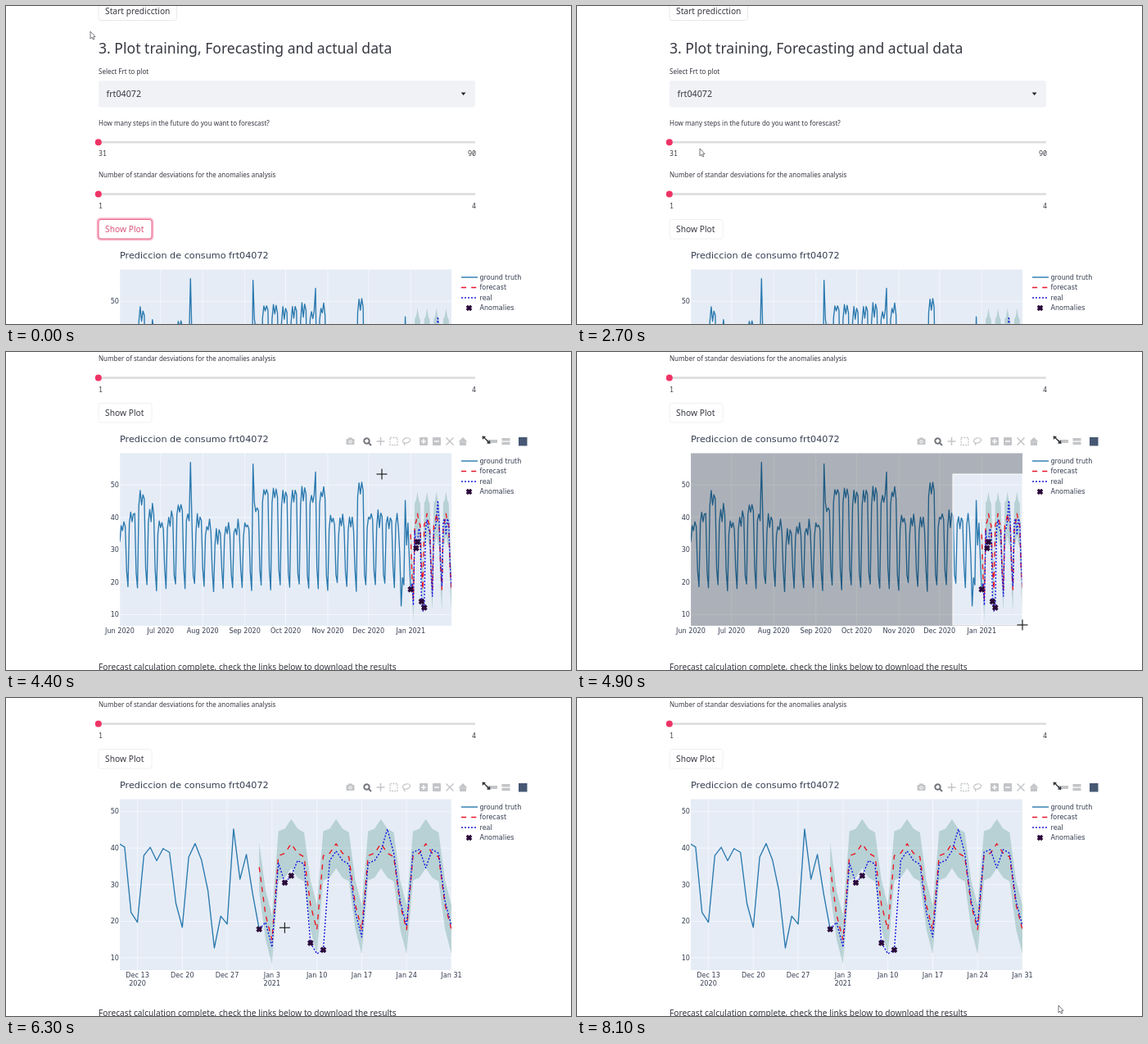
Write an HTML page with a canvas that moves like this. It is 690 px wide and 388 px high and loops after 8200 ms.

```html
<!DOCTYPE html>
<html lang="en">
<head>
<meta charset="utf-8">
<title>Forecast dashboard</title>
<style>
html, body { margin: 0; width: 100%; height: 100%; overflow: hidden; background: #fff; }
canvas { display: block; }
</style>
</head>
<body>
<canvas id="stage" width="690" height="388"></canvas>
<script>
const ctx = document.getElementById('stage').getContext('2d');
const LOOP = 8200, STEP = 100;
const SANS = '"Noto Sans", "Open Sans", sans-serif';
const MONO = '"Noto Sans Mono", "DejaVu Sans Mono", monospace';
const CHART = '"DejaVu Sans", sans-serif';
const INK = '#373942', PINK = '#ee3465', BLUE = '#2a79ae', AXIS = '#343d50', GREY = '#c3c5c8';
const LEFT = 139, RIGHT = 544, TOP = 123.5, PAGE = 198;

// Days count from Monday 1 June 2020
const JAN1 = 214, SPREAD = 6.7;
const MONTHS = 'Jan Feb Mar Apr May Jun Jul Aug Sep Oct Nov Dec'.split(' ');
const dateOf = d => new Date(Date.UTC(2020, 5, 1 + d));
const monthDay = d => `${MONTHS[dateOf(d).getUTCMonth()]} ${dateOf(d).getUTCDate()}`;

function noise(n) {
  const s = Math.sin(n * 127.1) * 43758.5453;
  return s - Math.floor(s);
}

function track(keys, t) {
  const i = keys.findIndex(k => t <= k[0]);
  if (i < 0) return keys[keys.length - 1].slice(1);
  const [t1, ...b] = keys[i], [t0, ...a] = keys[Math.max(i - 1, 0)];
  return b.map((v, j) => t1 === t0 ? v : a[j] + (v - a[j]) * (t - t0) / (t1 - t0));
}

// Weekly rhythm under a slowly changing level; unusual days override it
const level = [[0, 38], [2, 47], [4, 39], [6, 44], [10, 36], [13, 39], [15, 49], [21, 48], [22, 41], [24, 39], [25, 50], [26, 41]];
const unusual = { 52: 57, 98: 56.5, 144: 54, 206: 28.4, 207: 12.7, 208: 21.4, 210: 45.2, 211: 31.5, 213: 27.3, 214: 17.8 };
const surprise = { 1: 17.81236, 5: 30.54084, 6: 32.43617, 9: 14.05128, 10: 11.1, 11: 12.17342, 21: 45.2, 27: 34.6 };

function consumption(d) {
  const day = d % 7, wobble = (noise(d) - 0.5) * 3;
  if (day === 5) return 23.5 + wobble;
  if (day === 6) return 18.5 + wobble;
  return track(level, Math.floor(d / 7))[0] - [4, 0, 3, 0, 2][day] + wobble;
}

const days = (n, rule) => Array.from({ length: n }, (_, i) => rule(i));
const truth = days(JAN1 + 1, d => unusual[d] ?? consumption(d));
const forecast = days(31, i => [37.9, 38.6, 41.2, 38.6, 37.6, 24.5, 17.7][(JAN1 + i) % 7] - (i < 3 ? 2.8 : 0));
const real = days(31, i => surprise[i + 1] ?? forecast[i] + (i < 20 ? -2 : 1));
const anomalies = days(31, i => i).filter(i => real[i] < forecast[i] - SPREAD);

const fullView = {
  from: 0, to: 244, high: 59.81, low: 6.59, bottom: 334,
  ticks: days(8, m => {
    const d = (Date.UTC(2020, 5 + m, 1) - dateOf(0)) / 864e5, at = dateOf(d);
    return [d, `${MONTHS[at.getUTCMonth()]} ${at.getUTCFullYear()}`];
  })
};
const zoomView = {
  from: 192.25, to: 244, high: 53.36, low: 6.64, bottom: 332,
  ticks: days(8, i => {
    const d = 195 + 7 * i, year = dateOf(d).getUTCFullYear();
    return [d, monthDay(d), (!i || year !== dateOf(d - 7).getUTCFullYear()) && year];
  })
};

const path = [
  [0, 103, 31], [800, 240, 104], [1700, 330, 112], [1900, 330, 162], [2700, 150, 174],
  [3100, 140, 220], [3600, 140, 220], [4400, 459, 149], [4500, 459, 149], [4900, 544, 333],
  [5000, 544, 333], [5500, 343, 228], [5700, 343, 228], [6200, 312, 284], [6900, 511, 258],
  [7300, 511, 258], [8100, 588, 375]
];
const scrollKeys = [[3000, 0], [3200, 66], [3400, 66], [3600, PAGE]];

function text(s, x, y, size, color = INK, font = SANS, align = 'left') {
  ctx.font = `${size}px ${font}`;
  ctx.fillStyle = color;
  ctx.textAlign = align;
  ctx.fillText(s, x, y + size * 0.36);
}

function rect(x, y, w, h, fill) {
  ctx.fillStyle = fill;
  ctx.fillRect(x, y, w, h);
}

function box(x, y, w, h, r, fill, stroke, width = 1) {
  ctx.beginPath();
  ctx.roundRect(x, y, w, h, r);
  if (fill) { ctx.fillStyle = fill; ctx.fill(); }
  if (stroke) { ctx.strokeStyle = stroke; ctx.lineWidth = width; ctx.stroke(); }
}

function line(pts, color, width, dash = []) {
  ctx.beginPath();
  pts.forEach(p => ctx.lineTo(p[0], p[1]));
  ctx.strokeStyle = color;
  ctx.lineWidth = width;
  ctx.setLineDash(dash);
  ctx.stroke();
  ctx.setLineDash([]);
}

function poly(pts, fill) {
  ctx.beginPath();
  pts.forEach(p => ctx.lineTo(p[0], p[1]));
  ctx.closePath();
  ctx.fillStyle = fill;
  ctx.fill();
}

function ring(x, y, rx, ry, color, width) {
  ctx.beginPath();
  ctx.ellipse(x, y, rx, ry, -0.3, 0, 7);
  ctx.strokeStyle = color;
  ctx.lineWidth = width;
  ctx.stroke();
}

function plus(x, y, r, color, width) {
  line([[x - r, y], [x + r, y]], color, width);
  line([[x, y - r], [x, y + r]], color, width);
}

function cross(x, y, r, color, width) {
  line([[x - r, y - r], [x + r, y + r]], color, width);
  line([[x - r, y + r], [x + r, y - r]], color, width);
}

const marker = (x, y) => cross(x, y, 2.7, '#2b0a3a', 3.3);

function slider(y, label, min, max) {
  text(label, 113, y - 23, 8);
  rect(113, y - 1.3, 460, 2.6, '#dddddf');
  ctx.beginPath();
  ctx.arc(112.8, y, 4, 0, 7);
  ctx.fillStyle = PINK;
  ctx.fill();
  text(min, 113, y + 14, 8.4, INK, MONO);
  text(max, 574, y + 14, 8.4, INK, MONO, 'right');
}

function form(t) {
  box(113, -6, 95.5, 23.5, 3, '#fff', '#e8e9ec');
  text('Start predicction', 121, 6, 10.25);
  text('3. Plot training, Forecasting and actual data', 113, 52, 17.6);
  text('Select Frt to plot', 113, 80, 8);
  const active = t >= 800 && t < 1800, focus = t < 800;
  box(113, 91, 460, 32.5, 3, '#f0f2f6', active && PINK, 1.3);
  text('frt04072', 122.5, 107, 10.7);
  if (active) rect(166, 101, 1, 13, INK);
  poly([[555.7, 105.6], [561.5, 105.6], [558.6, 108.9]], '#222');
  slider(166.2, 'How many steps in the future do you want to forescast?', '31', '90');
  slider(229.5, 'Number of standar desviations for the anomalies analysis', '1', '4');
  if (focus) box(112.5, 260, 66, 24.5, 3, null, '#f9b5c8', 3.5);
  box(113, 260.5, 65, 23.5, 3, '#fff', focus ? '#e8638a' : '#f0f0f2');
  text('Show Plot', 121, 272, 10.25, focus ? '#d9537c' : INK);
  text('Forecast calculation complete, check the links below to download the results', 113, 582, 10.18);
}

function dropdown() {
  ctx.save();
  ctx.shadowColor = 'rgba(0,0,0,.28)';
  ctx.shadowBlur = 12;
  ctx.shadowOffsetY = 3;
  box(113, 124, 460.5, 207, 2, '#fff');
  ctx.restore();
  ctx.save();
  ctx.beginPath();
  ctx.rect(113, 124, 460.5, 205);
  ctx.clip();
  ['01099', '01101', '01143', '01903', '02443', '02444', '02455', '03282'].forEach((id, i) => {
    const y = 141 + i * 26.35;
    if (i % 3 === 0) rect(113, y - 12, 456, 25, '#fafafb');
    text('frt' + id, 123.5, y, 10.7, '#96979c');
  });
  rect(569.5, 128, 4, 11, '#8c8c8c');
  ctx.restore();
}

function legend() {
  const row = i => 133 + i * 12.5, key = i => [[556, row(i)], [576, row(i)]];
  line(key(0), BLUE, 1.4);
  line(key(1), '#e8142c', 1.4, [6.1, 6.1]);
  line(key(2), '#1c1cd8', 1.4, [2, 2]);
  marker(565.5, row(3));
  ['ground truth', 'forecast', 'real', 'Anomalies']
    .forEach((s, i) => text(s, 578.5, row(i), 8.05, AXIS, CHART));
}

function modebar(alpha) {
  const y = 109;
  ctx.save();
  ctx.globalAlpha = alpha;
  box(415.5, 106, 10, 7, 1, GREY);
  rect(418, 104.5, 5, 2, GREY);
  ring(420.5, 109.5, 1.7, 1.7, '#fff', 1);
  ring(440.5, 108.5, 3.2, 3.2, '#72757b', 2);
  line([[443, 111], [446, 114]], '#72757b', 2);
  plus(457.5, y, 5, GREY, 1.5);
  line([[469, 104.5], [478, 104.5], [478, 113.5], [469, 113.5], [469, 104.5]], GREY, 1.3, [2, 1.3]);
  ring(489, 108, 4.6, 3, GREY, 1.3);
  line([[486, 110.5], [487, 114]], GREY, 1.3);
  box(505, 104, 10, 10, 1, GREY);
  plus(510, y, 3, '#fff', 1.4);
  box(521, 104, 10, 10, 1, GREY);
  line([[523, y], [529, y]], '#fff', 1.4);
  cross(542, y, 4.5, GREY, 1.5);
  poly([[552.5, 109.5], [558, 104], [563.5, 109.5]], GREY);
  rect(554, 109.5, 8, 4.5, GREY);
  rect(587, 107, 13, 4, GREY);
  line([[583, 103.5], [590, 110.5]], '#35373b', 1.4);
  poly([[581.5, 102.5], [586, 103], [582, 107]], '#35373b');
  poly([[591.5, 112], [587, 111.5], [591, 107.5]], '#35373b');
  rect(605.5, 105, 10, 3.5, GREY);
  rect(605.5, 109.7, 10, 3.5, GREY);
  rect(626, 104, 10.5, 10.5, '#465873');
  ctx.restore();
}

function chart(t, view, mouse) {
  const { from, to, high, low, bottom } = view;
  const X = d => LEFT + (d - from) / (to - from) * (RIGHT - LEFT);
  const Y = v => TOP + (high - v) / (high - low) * (bottom - TOP);
  const series = (vals, d0 = 0, add = 0) => vals.map((v, i) => [X(d0 + i), Y(v + add)]);
  const grid = (a, b) => line([a, b], 'rgba(255,255,255,.7)', 0.8);
  text('Prediccion de consumo frt04072', LEFT, 105.5, 11.22, AXIS, CHART);
  rect(LEFT, TOP, RIGHT - LEFT, bottom - TOP, '#e5ecf6');
  for (let v = 10; v <= 50; v += 10) {
    grid([LEFT, Y(v)], [RIGHT, Y(v)]);
    text(v, 138, Y(v), 8.1, AXIS, CHART, 'right');
  }
  for (const [d, label, year] of view.ticks) {
    grid([X(d), TOP], [X(d), bottom]);
    text(label, X(d), bottom + 6, 8.1, AXIS, CHART, 'center');
    if (year) text(year, X(d), bottom + 16.3, 8.1, AXIS, CHART, 'center');
  }
  ctx.save();
  ctx.beginPath();
  ctx.rect(LEFT, TOP, RIGHT - LEFT, bottom - TOP);
  ctx.clip();
  ctx.lineJoin = 'round';
  poly([...series(forecast, JAN1, SPREAD), ...series(forecast, JAN1, -SPREAD).reverse()], 'rgba(0,100,80,.2)');
  line(series(truth), BLUE, 1.35);
  line(series(forecast, JAN1), '#f0101c', 1.35, [6.1, 6.1]);
  line(series(real, JAN1), '#1010e0', 1.35, [2, 2]);
  ctx.restore();
  const marks = anomalies.map(i => ({ x: X(JAN1 + i), y: Y(real[i]), i }));
  marks.forEach(m => marker(m.x, m.y));
  legend();
  if (t >= 3300) modebar(t < 3700 ? 0.6 : 1);
  if (t >= 4600 && t < 5000) zoomBox(mouse, bottom);
  if (t >= 5100) hover(marks, mouse);
}

function zoomBox([mx, my], bottom) {
  const area = [459, 149, mx - 459, my - 149];
  ctx.beginPath();
  ctx.rect(LEFT, TOP, RIGHT - LEFT, bottom - TOP);
  ctx.rect(...area);
  ctx.fillStyle = 'rgba(0,0,0,.25)';
  ctx.fill('evenodd');
  ctx.strokeStyle = '#fff';
  ctx.lineWidth = 1;
  ctx.strokeRect(...area);
}

function hover(marks, [mx, my]) {
  const near = marks.find(m => Math.hypot(m.x - mx, m.y - my) < 8);
  if (!near) return;
  const { x, y, i } = near;
  const label = `(${monthDay(JAN1 + i)}, 2021, ${real[i].toFixed(5)})`;
  ctx.font = `7.6px ${CHART}`;
  const w = ctx.measureText(label).width + 4;
  poly([[x + 3, y], [x + 7.5, y - 4], [x + 7.5, y + 4]], '#f00');
  rect(x + 7, y - 6.5, w, 13, '#f00');
  text(label, x + 9, y, 7.6, '#fff', CHART);
  text('Anomalies', x + w + 9.5, y, 7.6, '#f00', CHART);
}

function arrow(x, y) {
  const shape = [[0, 0], [0, 9], [2, 7.2], [3.4, 10], [4.8, 9.4], [3.5, 6.7], [6, 6.5], [0, 0]]
    .map(([dx, dy]) => [x + dx, y + dy]);
  poly(shape, '#fff');
  line(shape, '#66676c', 0.9);
}

function draw(t) {
  const [scroll] = track(scrollKeys, t), [mx, my] = track(path, t);
  const view = t < 5000 ? fullView : zoomView;
  const top = PAGE - scroll;
  rect(0, 0, 690, 388, '#fff');
  ctx.save();
  ctx.translate(0, -scroll);
  form(t);
  ctx.translate(0, PAGE);
  chart(t, view, [mx, my - top]);
  ctx.restore();
  if (t >= 1000 && t < 1800) return dropdown();
  const inPlot = mx >= LEFT && mx <= RIGHT && my >= TOP + top && my <= view.bottom + top;
  if (inPlot) plus(mx, my, 6.5, '#222', 1.2);
  else arrow(mx, my);
}

function tick() {
  const t = performance.now() % LOOP;
  draw(Math.floor(t / STEP) * STEP);
  requestAnimationFrame(tick);
}
tick();
</script>
</body>
</html>
```
